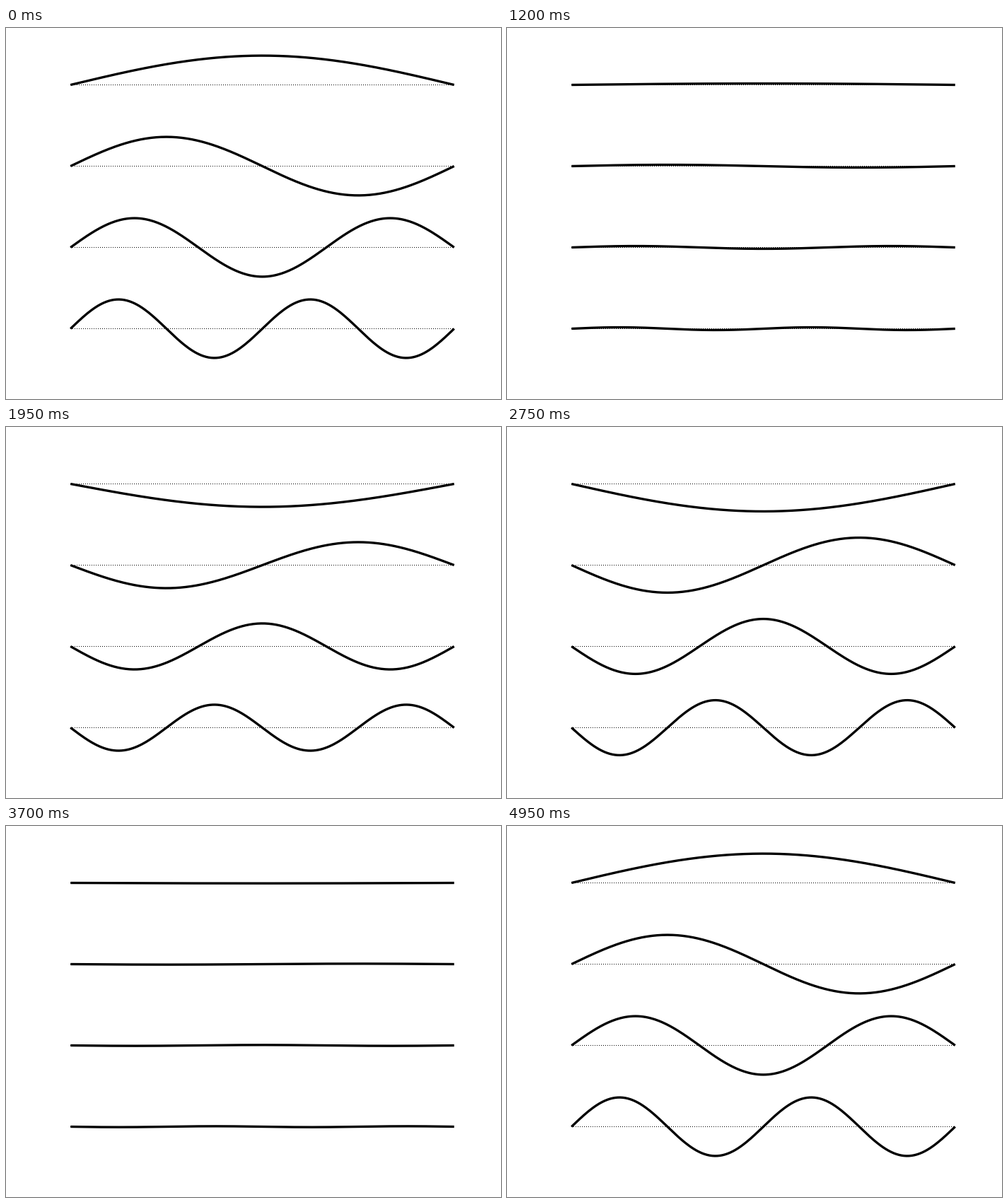
A matplotlib script that plays this animation: 700 by 525 pixels, repeating every 5000 ms.

```python
import numpy as np
import matplotlib.pyplot as plt
from matplotlib.animation import FuncAnimation

WIDTH, HEIGHT, DPI = 700, 525, 100
FRAMES, INTERVAL = 100, 50
LEFT, SPAN = 91.25, 542.5
TOP, SPACING, AMPLITUDE = 80.5, 115, 41.4
MODES = (1, 2, 3, 4)


def px(size):
    """Convert pixels to points."""
    return size * 72 / DPI


fig = plt.figure(figsize=(WIDTH / DPI, HEIGHT / DPI), dpi=DPI, facecolor="white")
ax = fig.add_axes([0, 0, 1, 1])
ax.set_xlim(0, WIDTH)
ax.set_ylim(HEIGHT, 0)
ax.axis("off")

u = np.linspace(0, 1, 301)
strings = []
for mode in MODES:
    base = TOP + SPACING * (mode - 1)
    ax.plot([91, 634], [base, base], color="black", lw=px(1),
            dashes=(1, 2), dash_capstyle="butt", snap=False)
    curve, = ax.plot([], [], color="black", lw=px(3.33), snap=False,
                     solid_capstyle="butt", solid_joinstyle="round")
    strings.append((curve, base, np.sin(mode * np.pi * u)))


def update(frame):
    # Both ends of the cycle are included, so the extremes are held twice.
    swing = AMPLITUDE * np.cos(2 * np.pi * frame / (FRAMES - 1))
    for curve, base, shape in strings:
        curve.set_data(LEFT + SPAN * u, base - swing * shape)
    return [curve for curve, _, _ in strings]


anim = FuncAnimation(fig, update, frames=FRAMES, interval=INTERVAL,
                     repeat=True, repeat_delay=0, blit=False)
plt.show()
```
